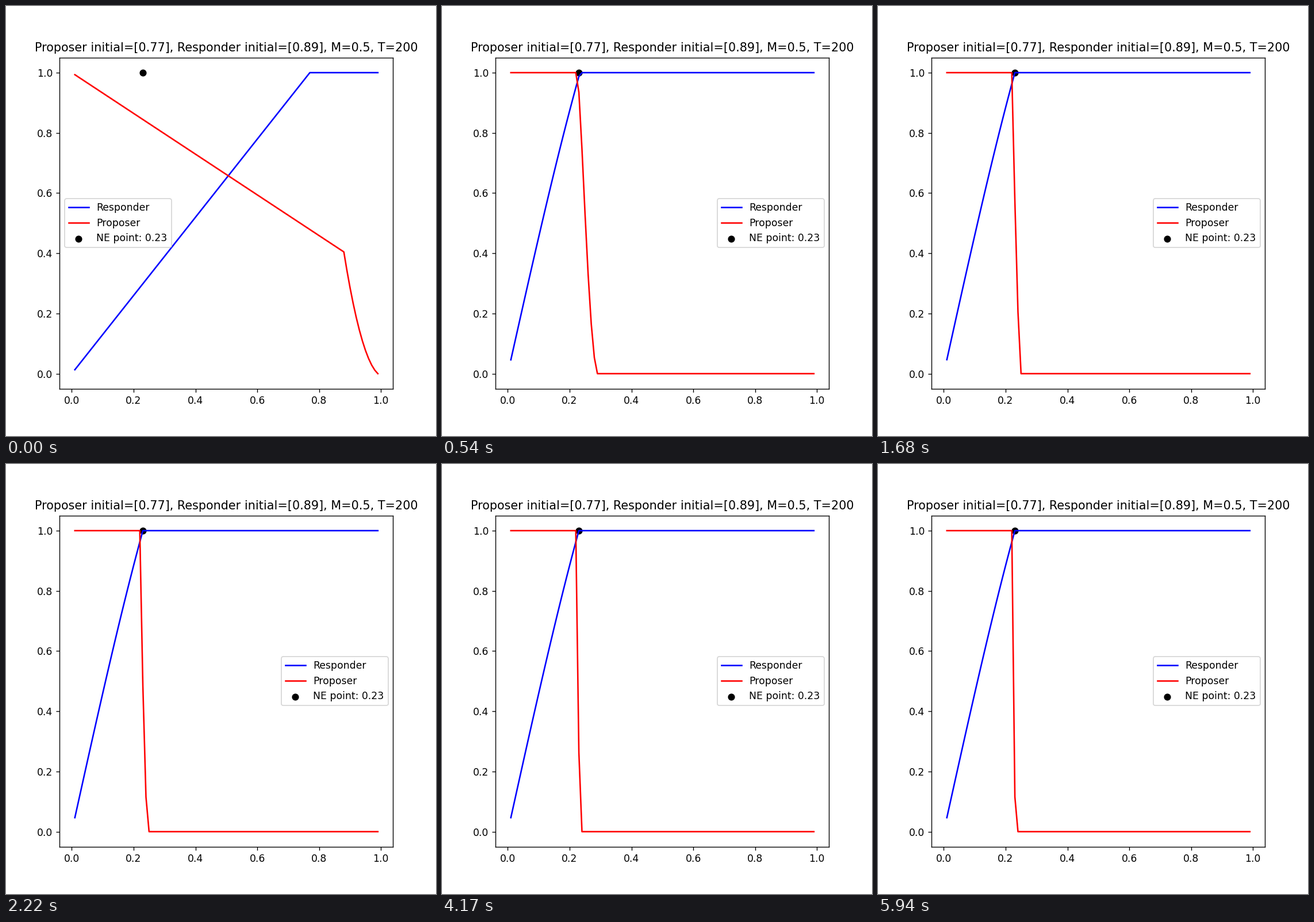
Write a matplotlib script that moves like this. It is 748x748 px and loops after 5.97 s.

```python
import numpy as np
import matplotlib.pyplot as plt
from matplotlib.animation import FuncAnimation

SIZE, INCHES = 748, 6
FRAMES, INTERVAL = 199, 30
STEP = 0.5                      # learning rate M
PROPOSER0, RESPONDER0 = 0.77, 0.89
NE = 0.23

grid = np.arange(1, 100) / 100


def pure(value):
    return (np.arange(1, 100) == round(value * 100)).astype(float)


def to_simplex(y):
    """Euclidean projection onto the probability simplex."""
    u = np.sort(y)[::-1]
    theta = (np.cumsum(u) - 1) / np.arange(1, len(u) + 1)
    k = np.nonzero(u > theta)[0][-1]
    return np.maximum(y - theta[k], 0)


def learn(steps):
    """Regularised-leader play of the ultimatum game, one curve pair per step."""
    offer, threshold = pure(PROPOSER0), pure(RESPONDER0)
    gain_p = np.zeros_like(grid)
    gain_r = np.zeros_like(grid)
    curves = []
    for _ in range(steps):
        gain_p += (1 - grid) * np.cumsum(threshold)
        gain_r += np.cumsum((offer * grid)[::-1])[::-1]
        offer = to_simplex(STEP * gain_p)
        threshold = to_simplex(STEP * gain_r)
        curves.append((np.cumsum(threshold), 1 - np.cumsum(offer)))
    return curves


curves = learn(FRAMES)

plt.rcParams["font.family"] = "DejaVu Sans"
fig, ax = plt.subplots(figsize=(INCHES, INCHES), dpi=SIZE / INCHES)
# Left edge sits just under a half pixel so the spine snaps outwards.
fig.subplots_adjust(left=0.1249, right=0.9, bottom=0.11, top=0.88)

responder, = ax.plot(grid, curves[0][0], "b", label="Responder")
proposer, = ax.plot(grid, curves[0][1], "r", label="Proposer")
ax.scatter([NE], [1], color="k", label=f"NE point: {NE}")
ax.set_xlim(-0.039, 1.039)
ax.set_ylim(-0.05, 1.05)
ax.set_title(f"Proposer initial=[{PROPOSER0}], Responder initial=[{RESPONDER0}], "
             f"M={STEP}, T=200")
ax.legend(loc="best")


def update(i):
    accept, exceed = curves[i]
    responder.set_ydata(accept)
    proposer.set_ydata(exceed)
    return responder, proposer


anim = FuncAnimation(fig, update, frames=FRAMES, interval=INTERVAL,
                     repeat=True, repeat_delay=0, blit=False)
plt.show()
```
